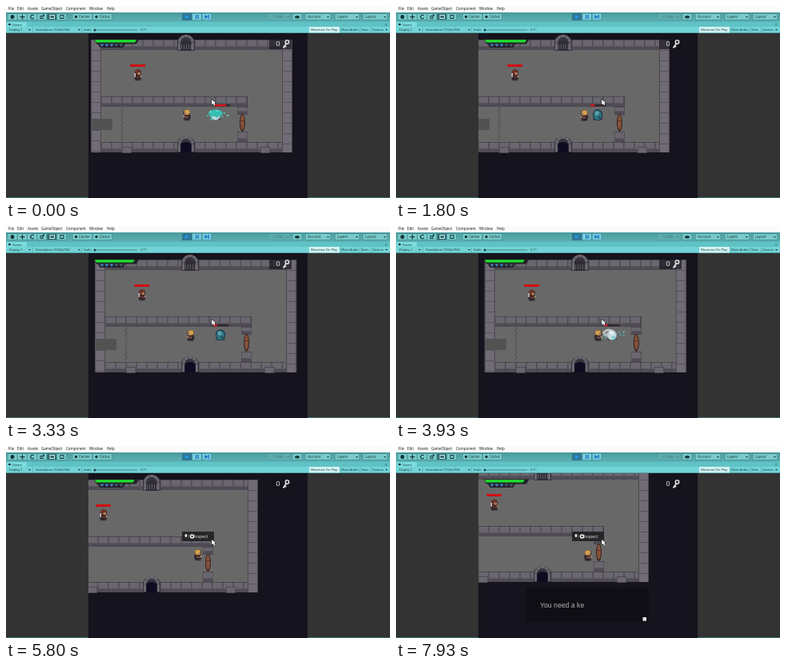
An HTML page with a canvas for the animation above (8 s loop, 480 by 240 pixels).

```html
<!DOCTYPE html>
<html lang="en">
<head>
<meta charset="utf-8">
<title>Dungeon play mode</title>
<style>
html, body { margin: 0; width: 100%; height: 100%; overflow: hidden; background: #333; }
canvas { display: block; width: 480px; height: 240px; }
</style>
</head>
<body>
<canvas id="stage"></canvas>
<script>
const LOOP = 8000, STEP = 200 / 3, CAMERA_LAG = 500;
const canvas = document.getElementById('stage');
const ctx = canvas.getContext('2d');
const dpr = Math.max(1, window.devicePixelRatio || 1);
canvas.width = 480 * dpr;
canvas.height = 240 * dpr;

const UI = '"Open Sans", "Noto Sans", sans-serif';
const ARIAL = '"Liberation Sans", Arial, sans-serif';
const DARK = '#15131d', FLOOR = '#686868', EDGE = '#38343d', INK = '#16383a';

// Walks along the room, as [time, x]
const heroWalk = [[-500, 254], [0, 226], [800, 259], [1500, 258], [2230, 242], [2730, 248],
  [3430, 222], [3930, 248], [4150, 248], [4530, 283], [6400, 283], [6730, 267], [6950, 263], [7300, 282]];
const slimeWalk = [[0, 262], [800, 276], [2730, 261], [3930, 265]];

// ---- motion ----
const clamp = v => Math.min(1, Math.max(0, v));
const smooth = k => k * k * (3 - 2 * k);

function along(keys, t) {
  const next = keys.findIndex(k => k[0] > t);
  if (next < 0) return keys[keys.length - 1][1];
  const [t0, x0] = keys[Math.max(0, next - 1)], [t1, x1] = keys[next];
  return x0 + (x1 - x0) * clamp((t - t0) / (t1 - t0 || 1));
}

const heroX = t => along(heroWalk, t);
const heroY = t => 136 + 13 * smooth(clamp((t - 6400) / 600));

// The camera centres on where the hero was, on average, a moment ago
function camera(t) {
  const n = 12;
  let x = 0, y = 0;
  for (let i = 0; i < n; i++) {
    const past = t - CAMERA_LAG * (i + .5) / n;
    x += heroX(past) / n;
    y += heroY(past) / n;
  }
  return [240 - x, 136 - y];
}

function random(seed) {
  const v = Math.sin(seed * 127.1) * 43758.5;
  return v - Math.floor(v);
}

// ---- drawing helpers ----
function box(x, y, w, h, color) {
  ctx.fillStyle = color;
  ctx.fillRect(x, y, w, h);
}

function frame(x, y, w, h, color) {
  ctx.strokeStyle = color;
  ctx.lineWidth = 1;
  ctx.strokeRect(x, y, w, h);
}

function shape(color, ...p) {
  ctx.fillStyle = color;
  ctx.beginPath();
  for (let i = 0; i < p.length; i += 2) ctx.lineTo(p[i], p[i + 1]);
  ctx.fill();
}

function oval(x, y, rx, ry, color) {
  ctx.fillStyle = color;
  ctx.beginPath();
  ctx.ellipse(x, y, rx, ry, 0, 0, Math.PI * 2);
  ctx.fill();
}

function arc(x, y, r, from, to, width, color) {
  ctx.strokeStyle = color;
  ctx.lineWidth = width;
  ctx.beginPath();
  ctx.arc(x, y, r, from * Math.PI, to * Math.PI);
  ctx.stroke();
}

function text(s, x, y, size = 4.4, color = INK, font = UI) {
  ctx.font = `${size}px ${font}`;
  ctx.fillStyle = color;
  ctx.fillText(s, x, y);
}

// ---- room ----
function brick(x, y, w = 13, h = 13, face = 4) {
  box(x, y, w, h, EDGE);
  box(x + .4, y + .6, w - .8, h - 1.2, '#6a666e');
  if (face) box(x + .4, y + h - face - .6, w - .8, face, '#504c55');
}

function wallRow(x, y, end) {
  for (; x < end; x += 13) brick(x, y, Math.min(13, end - x));
}

function wallCol(x, y, end) {
  box(x, y, 13, end - y, '#706b74');
  box(x, y, 1, end - y, '#4b4750');
  box(x + 12, y, 1, end - y, '#4b4750');
  for (; y < end; y += 13) box(x, y, 13, .8, '#514d56');
}

function arch(x, y, inner) {
  oval(x, y + 9, 11, 9, EDGE);
  box(x - 11, y + 9, 22, 11, EDGE);
  arc(x, y + 9.5, 8.3, 1, 2, 3, '#6d6971');
  for (const side of [-9.8, 6.8]) box(x + side, y + 10, 3, 9, '#6d6971');
  for (let a = 1.2; a < 2; a += .2) arc(x, y + 9.5, 8.3, a, a + .02, 3, EDGE);
  oval(x, y + 11, 6.7, 4, inner);
  box(x - 6.7, y + 11, 13.4, 9, inner);
}

function room() {
  box(106, 42, 252, 141, FLOOR);
  wallRow(106, 42, 358);
  wallRow(106, 170, 358);
  wallCol(106, 42, 141);
  wallCol(106, 155, 183);
  wallCol(345, 42, 183);
  wallRow(119, 113, 302);
  brick(289, 126, 13, 10);
  brick(289, 157);
  box(106, 141, 27, 14, '#525252');
  for (let y = 127; y < 169; y += 3) box(143 + y % 2, y, 3, 1.6, '#565658');
  for (const x of [145, 318]) brick(x, 176, 12, 8, 0);
  arch(225, 36, '#302d35');
  for (let x = 219; x < 232; x += 3) box(x, 48, 1, 6, '#625e67');
  arch(225, 163, '#0e0b22');
  oval(295.5, 146, 3.5, 11, '#38211d');
  oval(295.5, 145.5, 2.5, 9.5, '#85513b');
  box(293, 143, 5, 1, '#5a3023');
}

// ---- actors ----
function person(x, y, hair, coat, bob, dir) {
  ctx.save();
  ctx.translate(x, y + bob);
  ctx.scale(dir, 1);
  oval(0, 6, 4.5, 1.5, 'rgba(25,20,25,.45)');
  oval(-.3, 2.5, 4.5, 4, '#2b222b');
  oval(.5, 2, 2.8, 2.5, coat);
  oval(0, -2.5, 4.2, 4.2, '#3a241f');
  oval(-.3, -3.2, 3.5, 3.2, hair);
  box(0, -2.8, 3, 2.6, '#d3a07c');
  box(1.2, -2.4, .9, 1.2, '#33232a');
  box(3, 1, 1.5, 2, '#c79a7c');
  ctx.restore();
}

function guard(t) {
  box(155.5, 73, 18.5, 3, '#a80c12');
  box(155.5, 73.3, 18.5, 2.2, '#e00d12');
  person(165, 86, '#6e3528', '#5a342f', Math.floor(t / 400) % 2 * .5, 1);
  box(160.5, 84, 1.6, 5, '#c6c1bd');
}

function slime(t) {
  if (t > 4200) return;
  const x = along(slimeWalk, t), y = 136;
  const hits = [0, 700, 1500, 3850].filter(h => h <= t);
  const since = t - hits[hits.length - 1];
  const hit = since < 300;
  const barX = x - 9 + 8 * Math.exp(-t / 600);
  box(barX, 123, 19, 2.4, '#30262b');
  box(barX, 123, 14 / hits.length, 2.4, '#d81218');
  const tall = 6.8 + Math.sin(t / 130) * .4;
  oval(x, y + 5.5, 6.5, 1.6, 'rgba(25,25,30,.4)');
  oval(x, y + .3, 6.2, tall, hit ? '#a3aebd' : '#1f3d50');
  oval(x, y + .6, 5, tall - 1.3, hit ? '#c5dfe3' : '#2f7480');
  oval(x - 1, y - 2, 2.6, 2.8, hit ? '#eefafa' : '#5aa3a9');
  oval(x + 2, y + 3, 2, 1.5, hit ? '#75c9d3' : '#234d60');
  if (hit) burst(x, y, since / 300, hits.length);
}

function burst(x, y, k, seed) {
  ctx.globalAlpha = 1 - k;
  if (seed === 1) oval(x, y - 2, 9, 4.5, '#35bfb0');
  if (seed === 4) {
    arc(x - 4, y + 1, 7, 1.1, 1.9, 3, '#dce4e4');
    oval(x - 5, y, 5, 2.5, '#c6d0d1');
  }
  for (let i = 0; i < 9; i++) {
    const a = random(seed * 20 + i) * 6.28, r = 7 + random(i + seed) * 8 + k * 4;
    box(x + Math.cos(a) * r, y - 1 + Math.sin(a) * r * .5, 2, 1.6, i % 3 ? '#43cfc4' : '#7fe3d8');
  }
  ctx.globalAlpha = 1;
}

function player(t) {
  const x = heroX(t), step = x - heroX(t - STEP);
  const bob = Math.floor(t / (Math.abs(step) > .8 ? 133 : 400)) % 2 * .6;
  const hurt = t > 2640 && t < 2840;
  person(x, heroY(t), hurt ? '#dc8a4c' : '#d3a04a', hurt ? '#a45b3f' : '#6a4a45', bob, step < -.2 ? -1 : 1);
}

// ---- overlays ----
function gauge(x, y, w, h, color) {
  shape(color, x, y, x + w, y, x + w - h * .6, y + h, x + h * .6, y + h);
}

function hud(t) {
  const life = t < 2640 ? 52 : 49.5;
  gauge(109.5, 41.5, 57, 6, '#24222b');
  gauge(114, 46, 36, 6, '#24222b');
  gauge(111, 42.4, life, 3.4, '#18b326');
  gauge(111, 42.4, life, 2.3, '#22ea31');
  for (let i = 0; i < 5; i++) gauge(117.5 + i * 6, 47.6, 5, 3, i < 3 ? '#437fbd' : '#48586c');
  box(329, 40, 28, 14, 'rgba(21,19,29,.65)');
  text('0', 337.5, 50, 9, '#e4e4e4', ARIAL);
  arc(351.5, 45, 2.2, 0, 2, 1.6, '#dedede');
  shape('#dedede', 349.5, 46.5, 351, 47.5, 347.5, 53, 345.8, 52);
  box(347.8, 50, 2.6, 1.4, '#dedede');
}

function prompt() {
  box(220, 107, 40, 12, 'rgba(28,28,30,.86)');
  oval(225, 112, 1.5, 2, '#e4e4e4');
  text('/', 227.5, 115, 5.4, '#b5b5b5', ARIAL);
  arc(232.6, 113, 2, 0, 2, 1.6, '#f2f2f2');
  text('Inspect', 235, 115, 5.4, '#d8d8d8', ARIAL);
}

function dialog(t) {
  box(163, 178, 153, 42, '#0f0e14');
  const count = Math.max(0, Math.floor((t - 7480) / 33.5));
  text('You need a key'.slice(0, count), 180, 202, 8.7, '#b0b0b3', ARIAL);
  box(308.5, 214, 4.5, 4.7, '#e3e3e3');
}

function game(t) {
  ctx.save();
  ctx.beginPath();
  ctx.rect(103, 34, 274, 206);
  ctx.clip();
  box(103, 34, 274, 206, DARK);
  ctx.save();
  ctx.translate(...camera(t));
  room();
  guard(t);
  slime(t);
  player(t);
  ctx.restore();
  hud(t);
  if (t > 4620 && t < 6560 || t > 7240) prompt();
  if (t > 7450) dialog(t);
  ctx.restore();
  shape('#26262a', 256.6, 115.5, 256.6, 124.5, 263, 121.5);
  shape('#fff', 257.3, 117, 257.3, 123.2, 261.8, 121);
  box(259.7, 121, 1.2, 3, '#fff');
}

// ---- editor ----
function arrow(x, y) {
  shape(INK, x, y, x + 3, y, x + 1.5, y + 1.8);
}

function button(x, w, label, tx, menu) {
  box(x, 9.5, w, 8, '#3d8486');
  box(x + .5, 10, w - 1, 7, '#78cacb');
  text(label, tx, 15.3);
  if (menu) arrow(x + w - 5, 13);
}

function tools() {
  for (let i = 0; i < 6; i++) {
    const x = 2 + i * 12.3;
    box(x, 9.5, 12, 8, '#3d8486');
    box(x + .4, 10, 11.3, 7, i === 4 ? '#33696c' : '#78cacb');
  }
  oval(8, 13.5, 2.4, 2.6, INK);
  box(17.5, 13, 6, 1.2, INK);
  box(19.9, 10.6, 1.2, 6, INK);
  arc(33, 13.5, 2.3, .2, 1.8, 1.2, INK);
  frame(43, 12.5, 3, 3, INK);
  box(46, 10.5, 2, 2, INK);
  frame(55, 11.5, 5.5, 4, '#c5eeee');
  frame(68, 11.5, 4, 4, INK);
}

function playback() {
  const blue = '#1670c4';
  for (let i = 0; i < 3; i++) {
    box(220 + i * 12.5, 9, 12.2, 9, '#347b86');
    box(220.5 + i * 12.5, 9.5, 11.2, 8, i ? '#76cbdc' : '#2f7896');
  }
  shape('#1d9df0', 224, 11, 228.5, 13.5, 224, 16);
  for (const x of [237, 239.5, 252.5]) box(x, 11, 1.3, 5, blue);
  shape(blue, 248.5, 11, 252.5, 13.5, 248.5, 16);
}

function editor() {
  box(0, 0, 480, 240, '#333');
  box(0, 239.2, 480, .8, '#3d7f81');
  box(0, 0, 480, 8, '#fbfbfb');
  const menus = { File: 3, Edit: 14, Assets: 27, GameObject: 44, Component: 75, Window: 104, Help: 126 };
  for (const name in menus) text(name, menus[name], 5.3, 4.5, '#111');

  const bar = ctx.createLinearGradient(0, 8, 0, 20);
  bar.addColorStop(0, '#4b9b9d');
  bar.addColorStop(1, '#5cb1b3');
  box(0, 8, 480, 12, bar);
  tools();
  playback();
  button(83, 25, 'Center', 91);
  button(108.5, 24, 'Global', 116.5);
  box(86, 12, 3, 3, INK);
  oval(113, 13.5, 1.7, 1.7, INK);
  ctx.globalAlpha = .4;
  button(327, 29, 'Collab', 334, true);
  ctx.globalAlpha = 1;
  button(358, 12, '', 358);
  oval(364, 13.8, 3, 1.8, INK);
  button(374, 32, 'Account', 377, true);
  button(411, 31, 'Layers', 414, true);
  button(446, 31, 'Layout', 449, true);

  box(0, 20, 480, 6, '#5fc3c6');
  box(1, 20, 25, 6, '#7bdcdf');
  oval(4.5, 23, 1.6, 1.2, INK);
  text('Game', 8, 24.8, 4.3);
  text('≡', 474, 25, 4.3);

  box(0, 26, 480, 8, '#72d3d6');
  box(0, 33.4, 480, .6, '#3d8082');
  box(379, 26, 38, 7.4, '#d2f4f4');
  const labels = { 'Display 1': 4, 'Standalone (1024x768)': 37, Scale: 97, '3.71': 168,
    'Maximize On Play': 381, 'Mute Audio': 419, Stats: 444, Gizmos: 458 };
  for (const name in labels) text(name, labels[name], 31.2, 4);
  for (const x of [28, 90, 474]) arrow(x, 29);
  for (const x of [33, 94, 417, 442, 456]) box(x, 26, .5, 7.5, '#4b9ea0');
  box(110, 29.6, 54, .8, '#347577');
  oval(111, 30, 1.3, 1.6, INK);
}

function draw(now) {
  // Steps of 15 per second, with a little slack for rounded clocks
  const t = Math.floor(now % LOOP / STEP + .1) * STEP;
  ctx.setTransform(dpr, 0, 0, dpr, 0, 0);
  editor();
  game(t);
  requestAnimationFrame(draw);
}
requestAnimationFrame(draw);
</script>
</body>
</html>
```
